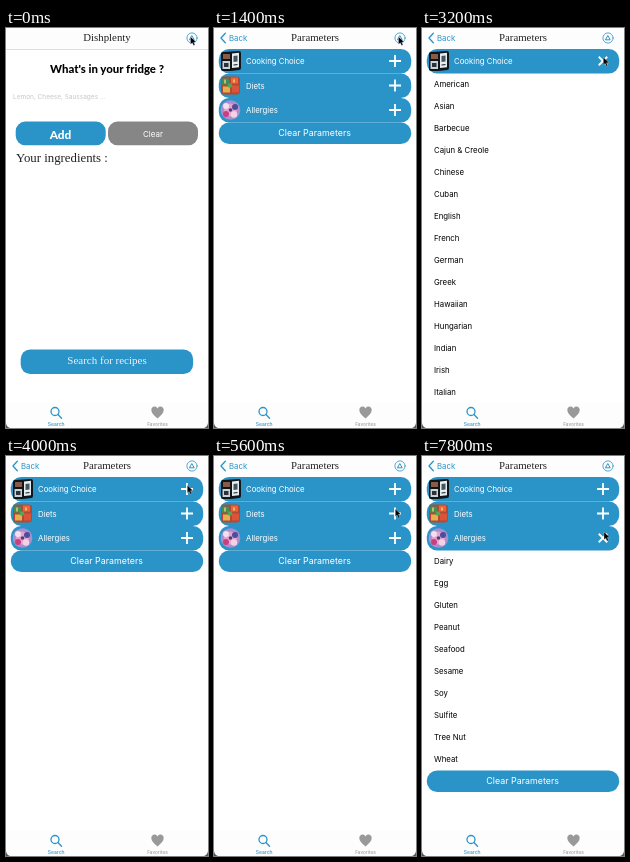
An HTML page for the animation above (8 s loop, 202 by 400 pixels).

```html
<!DOCTYPE html>
<html lang="en">
<head>
<meta charset="utf-8">
<title>Recipe search</title>
<style>
  html, body { margin: 0; width: 100%; height: 100%; overflow: hidden; background: #fff; }
  svg { display: block; width: 100%; height: 100%; }
  text { font: 7.8px Inter, sans-serif; }
  .mid { text-anchor: middle; }
  .script { font-family: "Liberation Serif", serif; }
  .comic { font-family: Lato, sans-serif; font-weight: 800; }
  .line { fill: none; stroke: #2a94c9; stroke-linecap: round; stroke-linejoin: round; }
</style>
</head>
<body>
<svg viewBox="0 0 202 400">
  <defs>
    <linearGradient id="edge">
      <stop offset="0" stop-color="#000" stop-opacity="0"/>
      <stop offset="1" stop-color="#000" stop-opacity=".04"/>
    </linearGradient>
    <g id="cooking">
      <path d="M3 1L19 0Q21 0 21 2V17Q21 19 19 19L11 20H3Q1 20 1 18V3Q1 1 3 1Z" fill="#10151a"/>
      <path d="M3 3h7v5H3z" fill="#8a5a45"/>
      <path d="M12 2.5l7-.7v14.4l-7 .8z" fill="#e6edf0"/>
      <path d="M13.5 5l4-.4v6l-4 .5z" fill="#47545c"/>
      <path d="M2.5 10h7.5v8H2.5z" fill="#c9d4d8"/>
      <path d="M4 12h4.5v4H4z" fill="#2b3238"/>
      <path d="M13.5 14l4-.4" stroke="#10151a"/>
    </g>
    <g id="diets">
      <rect x="1" y="1" width="19" height="18" rx="3" fill="#b5482f"/>
      <path d="M2 3h7v6H2z" fill="#3f8f5a"/>
      <path d="M11 2h7v6h-7z" fill="#e8663a"/>
      <path d="M3 11h7v6H3z" fill="#e3b04b"/>
      <path d="M12 10h7v7h-7z" fill="#d8553b"/>
      <circle cx="10" cy="10" r="2.3" fill="#4fa65e"/>
      <path d="M5 4v4M14 4v3" stroke="#f3d27a" stroke-width="1.4"/>
    </g>
    <g id="allergies">
      <circle cx="10.5" cy="10" r="9.8" fill="#a98fd0"/>
      <circle cx="10.5" cy="10" r="6.5" fill="#e8a3cb"/>
      <circle cx="6" cy="6" r="3" fill="#f3dfee"/>
      <circle cx="15" cy="7" r="3" fill="#4a4f9a"/>
      <circle cx="6" cy="14" r="3" fill="#c8407f"/>
      <circle cx="14" cy="14.5" r="3.2" fill="#f0d3e6"/>
      <circle cx="10.5" cy="10" r="1.8" fill="#4b3f8c"/>
    </g>
  </defs>

  <rect width="202" height="400" fill="#fff"/>

  <g id="home">
    <rect y="21" width="202" height="354" fill="#fff"/>
    <text class="mid comic" x="101" y="45" style="font-size:11.4px">What's in your fridge ?</text>
    <text x="7" y="71" fill="#c7c7cb" style="font-size:6.5px">Lemon, Cheese, Saussages ...</text>
    <rect x="9.7" y="93.6" width="90" height="23.6" rx="9.5" fill="#2a94c9"/>
    <text class="mid comic" x="54.5" y="110.5" fill="#fff" style="font-size:11.8px">Add</text>
    <rect x="102" y="93.6" width="90" height="23.6" rx="9.5" fill="#868686"/>
    <text class="mid" x="147" y="108.5" fill="#fff" style="font-size:8px">Clear</text>
    <text class="script" x="10" y="134" fill="#222" style="font-size:12.8px">Your ingredients :</text>
    <rect x="14.7" y="321.4" width="172.4" height="24.7" rx="9.5" fill="#2a94c9"/>
    <text class="mid script" x="101" y="336.4" fill="#e6f2f8" style="font-size:11px">Search for recipes</text>
  </g>
  <rect id="dim" y="21" width="202" height="354"/>

  <g id="params">
    <rect x="-8" y="21" width="8" height="354" fill="url(#edge)"/>
    <rect y="21" width="202" height="354" fill="#fff"/>
    <g id="table"></g>
  </g>

  <rect width="202" height="21" fill="#fdfdfd"/>
  <rect id="rule" y="21" width="202" height=".6" fill="#c9c9c9"/>
  <text id="homeTitle" class="mid script" y="13" fill="#222" style="font-size:10.8px">Dishplenty</text>
  <text id="paramsTitle" class="mid script" y="13" fill="#222" style="font-size:10.8px">Parameters</text>
  <path id="chevron" class="line" d="M11.3 5.3L7 10l4.3 4.7" stroke-width="1.3"/>
  <text id="back" x="15" y="13" fill="#2a94c9">Back</text>
  <g id="settings" class="line" stroke-width=".8">
    <circle cx="186" cy="10" r="5.1"/>
    <path d="M186 7.9l2.2 3.9h-4.4z" stroke-width="1"/>
  </g>

  <rect y="375" width="202" height="25" fill="#fdfdfd"/>
  <g class="line" stroke-width="1.3">
    <circle cx="49" cy="383.5" r="4"/>
    <path d="M52 386.5l3.5 3.7"/>
  </g>
  <text class="mid" x="50.2" y="397.6" fill="#2a94c9" style="font-size:5px;font-weight:500">Search</text>
  <path d="M151.5 390.4C148 387.6 145.3 385.2 145.3 382.1C145.3 378.2 149.8 377.3 151.5 380.4C153.2 377.3 157.7 378.2 157.7 382.1C157.7 385.2 155 387.6 151.5 390.4Z" fill="#999"/>
  <text class="mid" x="151.5" y="397.6" fill="#929292" style="font-size:4.8px">Favorites</text>
  <path d="M0 395q.5 4 4 5H0zM202 395q-.5 4-4 5h4z" fill="#555"/>

  <path id="cursor" d="M0 0v7.6l1.8-1.5 1.3 2.8 1.4-.7-1.3-2.7 2.4-.2z" fill="#000" stroke="#fff" stroke-width=".3"/>
</svg>
<script>
const $ = id => document.getElementById(id);
const LOOP = 8000, TICK = 200, HEADER = 24.5, ROW = 22;

const sections = [
  { icon: 'cooking', name: 'Cooking Choice', open: 3200, close: 3800,
    items: ['American', 'Asian', 'Barbecue', 'Cajun & Creole', 'Chinese', 'Cuban', 'English', 'French',
            'German', 'Greek', 'Hawaiian', 'Hungarian', 'Indian', 'Irish', 'Italian', 'Japanese'] },
  { icon: 'diets', name: 'Diets', open: 5000, close: 5600,
    items: ['Lacto vegetarian', 'Ovo vegetarian', 'Pescetarian', 'Vegan', 'Vegetarian'] },
  { icon: 'allergies', name: 'Allergies', open: 7200, close: LOOP,
    items: ['Dairy', 'Egg', 'Gluten', 'Peanut', 'Seafood', 'Sesame', 'Soy', 'Sulfite', 'Tree Nut', 'Wheat'] }
];

const bar = height => `<rect x="4.8" width="192.4" height="${height}" rx="10.4" fill="#2a94c9"/>`;

const sectionMarkup = ({ icon, name, items }) => `<g>
  ${bar(24.5)}
  <use href="#${icon}" x="6" y="2"/>
  <text x="32" y="15" fill="#fff">${name}</text>
  <path d="M-6 0H6M0-6V6" stroke="#fff" stroke-width="1.8"/>
  <g>${items.map((item, i) =>
    `<text x="12" y="${HEADER + ROW * i + 13.8}">${item.replace('&', '&amp;')}</text>`).join('')}</g>
</g>`;

$('table').innerHTML = sections.map(sectionMarkup).join('') +
  `<g>${bar(21.5)}<text class="mid" x="100.7" y="13.8" fill="#fff" style="font-size:8.9px">Clear Parameters</text></g>`;
const groups = [...$('table').children];

const slide = [[800, 0], [1000, .42], [1200, .92], [1400, 1]];
const cursorX = [[1800, 184.5], [2600, 181.3], [6000, 181.3], [6800, 182]];
const cursorY = [[1800, 8.7], [2600, 29.3], [4000, 29.3], [4600, 53], [6000, 53], [6800, 76]];

function sample(keys, t) {
  const next = keys.findIndex(([time]) => time > t);
  if (next === 0) return keys[0][1];
  if (next < 0) return keys[keys.length - 1][1];
  const [t0, a] = keys[next - 1], [t1, b] = keys[next];
  return a + (b - a) * (t - t0) / (t1 - t0);
}

const move = (el, x, y) => el.setAttribute('transform', `translate(${x} ${y})`);
const fade = (id, value) => $(id).setAttribute('opacity', value);

function drawPush(p) {
  move($('home'), -60 * p, 0);
  move($('params'), 202 * (1 - p), 0);
  fade('params', p > 0 ? 1 : 0);
  fade('dim', .11 * p);
  fade('rule', 1 - p);
  $('homeTitle').setAttribute('x', 101 - 53 * p);
  $('paramsTitle').setAttribute('x', 101 + 105 * (1 - p));
  fade('homeTitle', Math.min(1, 1.2 * (1 - p)));
  fade('paramsTitle', p * p);
  fade('chevron', p);
  fade('back', Math.max(0, 2 * p - 1));
}

function drawTable(t) {
  let y = 21;
  sections.forEach(({ open, close, items }, i) => {
    const [, , , plus, list] = groups[i].children;
    const isOpen = t >= open && t < close;
    move(groups[i], 0, y);
    plus.setAttribute('transform', `translate(181 12) rotate(${isOpen ? 45 : 0})`);
    list.setAttribute('display', isOpen ? 'inline' : 'none');
    y += HEADER + (isOpen ? ROW * items.length : 0);
  });
  move(groups[3], 0, y);
}

function frame(now) {
  const t = Math.floor(now % LOOP / TICK) * TICK;
  drawPush(sample(slide, t));
  drawTable(t);
  fade('settings', t >= 800 && t < 1200 ? .4 : 1);
  move($('cursor'), sample(cursorX, t), sample(cursorY, t));
  requestAnimationFrame(frame);
}
frame(performance.now());
</script>
</body>
</html>
```
